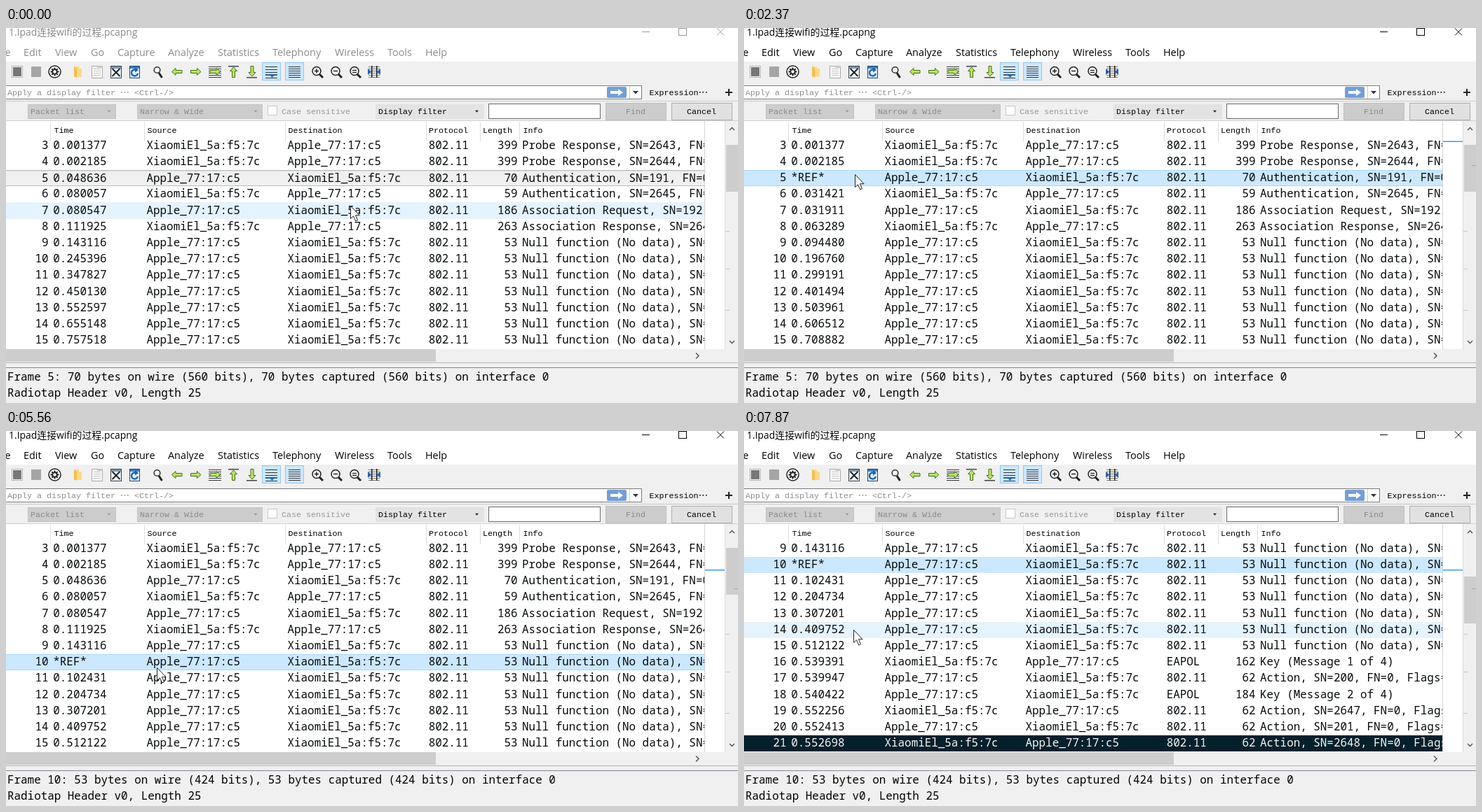
An HTML page with a canvas for the animation above (8 s loop, 1044 by 536 pixels).

```html
<!DOCTYPE html>
<html lang="en">
<head>
<meta charset="utf-8">
<title>Packet list</title>
<style>
html, body { margin: 0; width: 100%; height: 100%; overflow: hidden; background: #f0f0f0; }
canvas { display: block; width: 1044px; height: 536px; }
</style>
</head>
<body>
<canvas id="stage" width="1044" height="536"></canvas>
<script>
const ctx = document.getElementById('stage').getContext('2d');
const LOOP = 8000;
const MONO = '500 15.9px "Noto Sans Mono", monospace';
const SMALL = '11.68px "Liberation Mono", monospace';
const MENU = '14.4px "Open Sans", "Noto Sans", sans-serif';
const TITLE = '13.9px "Open Sans", "Noto Sans CJK SC", "Noto Sans CJK", sans-serif';

const ROW_TOP = 156.6, ROW_H = 23.2, ROWS = 13;
const PAD = 'Apple_77:17:c5', ROUTER = 'XiaomiEl_5a:f5:7c';

// number: [time, fromRouter, length, info, protocol]
const packets = {
  3: [0.001377, 1, 399, 'Probe Response, SN=2643, FN=0'],
  4: [0.002185, 1, 399, 'Probe Response, SN=2644, FN=0'],
  5: [0.048636, 0, 70, 'Authentication, SN=191, FN=0'],
  6: [0.080057, 1, 59, 'Authentication, SN=2645, FN=0'],
  7: [0.080547, 0, 186, 'Association Request, SN=192, FN=0'],
  8: [0.111925, 1, 263, 'Association Response, SN=2646'],
  16: [0.784787, 1, 162, 'Key (Message 1 of 4)', 'EAPOL'],
  17: [0.785343, 0, 62, 'Action, SN=200, FN=0, Flags=.'],
  18: [0.785818, 0, 184, 'Key (Message 2 of 4)', 'EAPOL'],
  19: [0.797652, 1, 62, 'Action, SN=2647, FN=0, Flags=.'],
  20: [0.797809, 0, 62, 'Action, SN=201, FN=0, Flags=.'],
  21: [0.798094, 1, 62, 'Action, SN=2648, FN=0, Flags=.']
};
[0.143116, 0.245396, 0.347827, 0.450130, 0.552597, 0.655148, 0.757518].forEach((t, i) => {
  packets[9 + i] = [t, 0, 53, `Null function (No data), SN=${193 + i}`];
});

// [start ms, x, y] of the pointer tip
const pointer = [
  [0, 491, 254], [1260, 474, 209], [1340, 420, 208], [1420, 345, 208], [1500, 268, 209],
  [1580, 205, 209], [1660, 170, 209], [1740, 158, 209], [2670, 186, 262], [2750, 206, 320],
  [3610, 206, 319], [3680, 205, 312], [4310, 200, 326], [4380, 197, 337], [4860, 206, 337],
  [4930, 215, 338], [6250, 220, 343], [6320, 227, 352], [6400, 230, 360], [6860, 222, 357],
  [6940, 205, 346], [7020, 186, 332], [7100, 172, 319], [7180, 163, 309], [7260, 160, 304],
  [7800, 158, 241], [7870, 156, 284]
];

function stateAt(t) {
  const [, x, y] = pointer.findLast(p => p[0] <= t);
  return {
    x, y,
    active: t >= 1900,
    selected: t < 4700 ? 5 : 10,
    ref: t >= 5480 ? 10 : t >= 2370 && t < 3990 ? 5 : 0,
    first: t < 6630 ? 3 : t < 7580 ? 6 : 9,
    click: (t >= 1820 && t < 1980) || (t >= 4630 && t < 4700)
  };
}

function rect(x, y, w, h, fill, stroke) {
  if (fill) { ctx.fillStyle = fill; ctx.fillRect(x, y, w, h); }
  if (stroke) {
    ctx.strokeStyle = stroke;
    ctx.lineWidth = 1;
    ctx.strokeRect(x + 0.5, y + 0.5, w - 1, h - 1);
  }
}

function text(s, x, y, font, color, align = 'left') {
  ctx.font = font;
  ctx.fillStyle = color;
  ctx.textAlign = align;
  ctx.fillText(s, x, y);
}

function line(points, color, width = 1) {
  ctx.strokeStyle = color;
  ctx.lineWidth = width;
  ctx.beginPath();
  for (let i = 0; i < points.length; i += 2) ctx.lineTo(points[i], points[i + 1]);
  ctx.stroke();
}

function poly(points, fill, stroke) {
  ctx.beginPath();
  for (let i = 0; i < points.length; i += 2) ctx.lineTo(points[i], points[i + 1]);
  ctx.closePath();
  ctx.fillStyle = fill;
  ctx.fill();
  if (stroke) { ctx.strokeStyle = stroke; ctx.lineWidth = 1; ctx.stroke(); }
}

function circle(x, y, r, fill, stroke, width = 1) {
  ctx.beginPath();
  ctx.arc(x, y, r, 0, Math.PI * 2);
  if (fill) { ctx.fillStyle = fill; ctx.fill(); }
  if (stroke) { ctx.strokeStyle = stroke; ctx.lineWidth = width; ctx.stroke(); }
}

function at(x, y, angle, draw) {
  ctx.save();
  ctx.translate(x, y);
  ctx.rotate(angle);
  draw();
  ctx.restore();
}

const caret = (x, y, color, r = 3) => poly([x - r, y - r / 2, x + r, y - r / 2, x, y + r / 2 + 0.5], color);

function dots(x, y, color) {
  for (let i = 0; i < 3; i++) rect(x + i * 4.5, y, 1.6, 1.6, color);
}

function drawTitle(active) {
  const color = active ? '#000' : '#999';
  rect(0, 0, 1044, 48, '#fff');
  text('1.Ipad连接wifi的过程.pcapng', 4, 11, TITLE, active ? '#000' : '#888');
  line([907, 5.5, 918, 5.5], color);
  rect(959, 0, 12, 11, null, color);
  line([1014, 0.5, 1024, 10.5], color);
  line([1024, 0.5, 1014, 10.5], color);
  const menu = active ? '#000' : '#8c8c8c';
  text('e', 6.5, 39.5, MENU, menu, 'right');
  const items = { Edit: 25, View: 70, Go: 121, Capture: 159, Analyze: 231, Statistics: 302,
    Telephony: 380, Wireless: 469, Tools: 544, Help: 598 };
  for (const name in items) text(name, items[name], 39.5, MENU, menu);
}

function greenArrow(x, y, angle) {
  at(x, y, angle, () =>
    poly([-7.5, 0, -2, -5, -2, -2, 7, -2, 7, 2, -2, 2, -2, 5], '#b9e663', '#446e1a'));
}

function magnifier(x, mark) {
  line([x + 3, 66, x + 8, 71], '#222', 3);
  circle(x - 1, 61.5, 6, '#f4f4f4', '#222', 1.5);
  if (mark === '=') {
    line([x - 4, 60.5, x + 2, 60.5], '#222', 1.3);
    line([x - 4, 63.5, x + 2, 63.5], '#222', 1.3);
  } else {
    line([x - 4, 61.5, x + 2, 61.5], '#222', 1.5);
    if (mark === '+') line([x - 1, 58.5, x - 1, 64.5], '#222', 1.5);
  }
}

function stripes(x, w, from, count, step, color) {
  for (let i = 0; i < count; i++) rect(x, from + i * step, w, 1, color);
}

function drawToolbar() {
  rect(0, 48, 1044, 32, '#f0f0f0');
  rect(8, 54, 16, 17, '#f8f8f8', '#b5b5b5');
  rect(10, 56, 12, 13, '#777');
  rect(36, 55, 14, 15, '#a5a5a5');

  circle(69.5, 62.5, 8.5, '#fff', '#222', 1.5);
  for (let i = 0; i < 8; i++) at(69.5, 62.5, i * Math.PI / 4, () => rect(-1, -6, 2, 3, '#222'));
  circle(69.5, 62.5, 3.3, '#fff', '#222', 2);

  poly([97, 55, 104, 55, 104, 58, 108, 58, 108, 70, 97, 70], '#fcd987');
  poly([97, 55, 101, 58, 101, 71, 97, 69], '#f5bd50');

  rect(122, 54, 16, 18, '#fafafa', '#a9a9a9');
  stripes(125, 10, 58, 4, 3, '#c4c4c4');
  rect(130, 54, 8, 3, '#c4c4c4');

  rect(149, 54, 16, 18, '#e9eff5', '#38434c');
  rect(150, 55, 14, 3, '#7a98b3');
  line([151.5, 58, 162.5, 69], '#222', 2);
  line([162.5, 58, 151.5, 69], '#222', 2);

  rect(176, 54, 15, 18, '#e3eefb', '#1d4777');
  rect(177, 55, 13, 3, '#3f7cbd');
  ctx.beginPath();
  ctx.arc(183.5, 64, 4.5, 0.2, 5);
  ctx.strokeStyle = '#1763b0';
  ctx.lineWidth = 2.4;
  ctx.stroke();
  poly([184, 56, 189, 60, 184, 63.5], '#1763b0');

  line([218, 64, 222.5, 71], '#222', 3);
  circle(215.5, 60, 4.3, '#fff', '#333', 1.6);

  greenArrow(244, 62.5, 0);
  greenArrow(270.5, 62.5, Math.PI);
  stripes(289, 18, 55, 6, 3, '#333');
  greenArrow(298, 62.5, Math.PI);
  rect(317, 54, 15, 1.5, '#444');
  greenArrow(324.5, 63.5, Math.PI / 2);
  greenArrow(351, 61.5, -Math.PI / 2);
  rect(343, 70, 15, 1.5, '#444');

  rect(365, 49, 27, 26, '#cce8ff', '#90c8f6');
  stripes(370, 17, 55, 3, 4, '#333');
  rect(370, 66, 17, 2, '#2464b0');
  poly([375, 66, 384, 66, 379.5, 71], '#2464b0');
  rect(370, 71, 17, 1, '#333');

  rect(398, 49, 27, 26, '#cce8ff', '#90c8f6');
  stripes(403, 17, 55, 6, 3, '#333');

  magnifier(444, '+');
  magnifier(471, '-');
  magnifier(498, '=');

  stripes(517, 16, 55, 6, 3, '#777');
  rect(521, 54, 1.5, 17, '#222');
  rect(528, 54, 1.5, 17, '#222');
  poly([516, 58, 521, 62.5, 516, 67], '#2464b0');
  poly([534, 58, 529, 62.5, 534, 67], '#2464b0');
}

function drawFilters() {
  rect(0, 79, 1044, 54, '#f0f0f0');
  rect(-2, 82, 909, 20, '#fff', '#7a7a7a');
  text('Apply a display filter', 2, 96, SMALL, '#8c8c8c');
  dots(164, 91, '#8c8c8c');
  text('<Ctrl-/>', 183, 96, SMALL, '#8c8c8c');
  ctx.beginPath();
  ctx.roundRect(857, 84, 28, 16, 2);
  ctx.fillStyle = '#739fd6';
  ctx.fill();
  poly([862, 90, 873, 90, 873, 87, 880, 92, 873, 97, 873, 94, 862, 94], '#fff');
  rect(889, 83, 1, 18, '#c8c8c8');
  caret(898, 92, '#333', 4);
  text('Expression', 917.5, 96, SMALL, '#000');
  dots(989, 91, '#000');
  line([1026, 92, 1036, 92], '#222', 2);
  line([1031, 87, 1031, 97], '#222', 2);

  rect(0, 104, 1044, 1, '#c9c9c9');
  rect(31, 109, 126, 21, '#ccc', '#c4c4c4');
  text('Packet list', 35, 123, SMALL, '#8a8a8a');
  caret(147, 119, '#999', 2.5);
  rect(187, 109, 179, 21, '#ccc', '#c4c4c4');
  text('Narrow & Wide', 191, 123, SMALL, '#8a8a8a');
  caret(356, 119, '#999', 2.5);
  rect(373, 111, 14, 14, '#fff', '#c6c6c6');
  text('Case sensitive', 393, 123, SMALL, '#979797');
  rect(527, 109, 155, 21, '#e3e3e3');
  text('Display filter', 531, 123, SMALL, '#000');
  caret(671.5, 119, '#222', 2.5);
  rect(688, 108, 160, 22, '#fff', '#6a6a6a');
  rect(855, 107, 87, 25, '#ccc', '#bfbfbf');
  text('Find', 884, 123, SMALL, '#8a8a8a');
  rect(949, 107, 87, 25, '#e1e1e1', '#adadad');
  text('Cancel', 971, 123, SMALL, '#000');
  rect(0, 132, 1044, 1, '#cfcfcf');
}

function drawRow(i, s) {
  const no = s.first + i;
  const [time, fromRouter, length, info, proto = '802.11'] = packets[no];
  const top = Math.round(ROW_TOP + i * ROW_H);
  const h = Math.round(ROW_TOP + (i + 1) * ROW_H) - top;
  const hover = s.y >= top && s.y < top + h;
  const selected = no === s.selected;
  const dark = no === 21;
  let drop = 0;

  if (dark) rect(0, top, 997, h, '#03202b');
  if (selected && !s.active) {
    rect(0, top, 997, h, '#f0f0f0');
    rect(0, top, 997, 1, '#bdbdbd');
    rect(0, top + 1, 997, 1, '#dedede');
    rect(0, top + h - 1, 997, 1, '#bdbdbd');
    drop = 1;
  } else if (selected) {
    rect(0, top, 997, h, '#cce8ff');
    if (hover) {
      rect(0, top, 997, 1, '#a6d8ff');
      rect(0, top + h - 1, 997, 1, '#a6d8ff');
    }
  } else if (hover) {
    rect(0, top, 997, h, '#e5f3ff');
  }

  const base = Math.round(167.5 + i * ROW_H + 5.3) + drop;
  const color = dark ? '#f7f7f7' : '#050a0c';
  const shown = s.ref && no >= s.ref ? time - packets[s.ref][0] : time;
  const cell = (str, x, align) => text(str, x, base, MONO, color, align);
  cell(no, 60.5, 'right');
  cell(no === s.ref ? '*REF*' : shown.toFixed(6), 67.3);
  cell(fromRouter ? ROUTER : PAD, 200.5);
  cell(fromRouter ? PAD : ROUTER, 401.5);
  cell(proto, 602.7);
  cell(length, 729.5, 'right');
  cell(info, 736);
}

function drawTable(s) {
  rect(0, 133, 1044, 326, '#fff');
  ctx.save();
  ctx.beginPath();
  ctx.rect(0, 160, 997, 299);
  ctx.clip();
  for (let i = 0; i < ROWS; i++) drawRow(i, s);
  ctx.restore();

  const heads = { Time: 68.5, Source: 201.5, Destination: 402.5, Protocol: 603, Length: 680, Info: 737.5 };
  for (const name in heads) text(name, heads[name], 150, SMALL, '#000');
  for (const x of [63, 197, 398, 599, 676, 732]) rect(x, 134, 1, 28, '#dedede');

  rect(996, 133, 1, 326, '#d4d4d4');
  if (s.active) rect(997, s.selected === 5 ? 161.5 : 198, 28, 1.5, '#3c9be6');
}

function drawScrollbars(s) {
  rect(1025, 133, 19, 326, '#f0f0f0');
  rect(1025, 133, 1, 326, '#dcdcdc');
  rect(1027, { 3: 167, 6: 187, 9: 208 }[s.first], 17, 67, '#cdcdcd');
  line([1032, 146, 1035.5, 142.5, 1039, 146], '#505050', 1.4);
  line([1032, 447, 1035.5, 450.5, 1039, 447], '#505050', 1.4);
  for (const y of [290, 344, 403]) rect(1026, y, 6, 1, '#c6c6c6');
  if (s.ref) rect(1038, s.ref === 5 ? 196 : 225, 6, 1, '#a8a8a8');

  rect(0, 459, 1044, 19, '#f0f0f0');
  rect(0, 459, 613, 18, '#cdcdcd');
  line([984, 464.5, 988, 468.5, 984, 472.5], '#505050', 1.4);
}

function drawDetails(s) {
  rect(0, 478, 1044, 58, '#f0f0f0');
  rect(0, 478, 1044, 1, '#b4b4b4');
  rect(0, 485, 1044, 1, '#828790');
  const bytes = packets[s.selected][2];
  const size = `${bytes} bytes`, bits = `(${bytes * 8} bits)`;
  text(`Frame ${s.selected}: ${size} on wire ${bits}, ${size} captured ${bits} on interface 0`,
    2, 503.5, MONO, '#000');
  text('Radiotap Header v0, Length 25', 2, 527, MONO, '#000');
}

function drawPointer(s) {
  if (s.click) {
    ctx.globalCompositeOperation = 'multiply';
    circle(s.x, s.y, 14, '#f7ed35');
    ctx.globalCompositeOperation = 'source-over';
  }
  at(s.x + 0.5, s.y + 0.5, 0, () =>
    poly([0, 0, 0, 18, 4, 14.3, 7.2, 21.5, 10, 20.3, 7, 13.2, 12.6, 13.2], '#fff', '#222'));
}

function frame(now) {
  const s = stateAt(now % LOOP);
  drawTitle(s.active);
  drawToolbar();
  drawFilters();
  drawTable(s);
  drawScrollbars(s);
  drawDetails(s);
  drawPointer(s);
  requestAnimationFrame(() => frame(performance.now() - start));
}

const start = performance.now();
frame(0);
</script>
</body>
</html>
```
